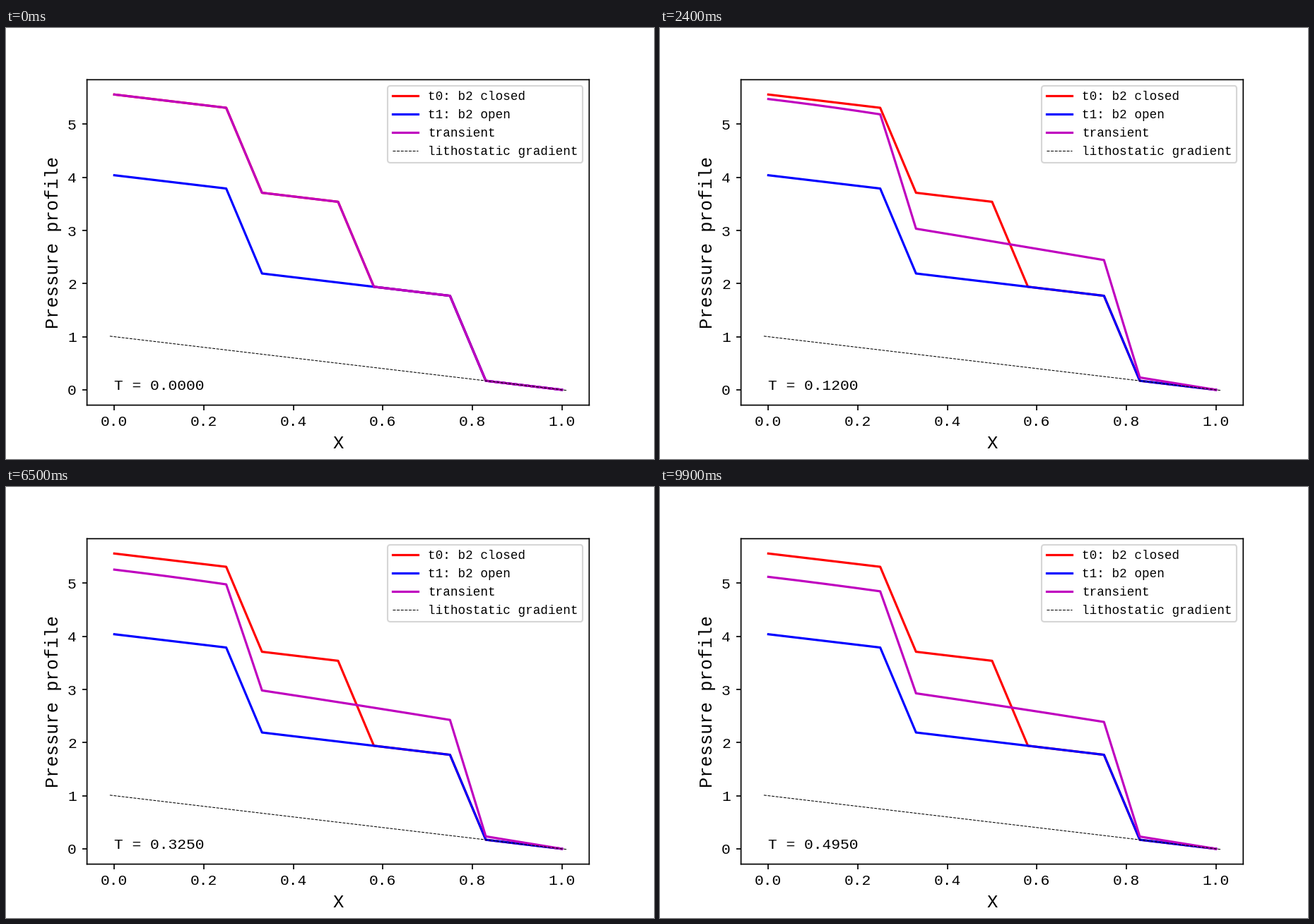
Animation of 917 by 611 pixels, one loop 10000 ms. Source, as a matplotlib script:

```python
import numpy as np
import matplotlib.pyplot as plt
from matplotlib.animation import FuncAnimation

W, H, DPI = 917, 611, 152.8
FRAMES, INTERVAL, DT = 100, 100, 0.005
N = 400
BARRIERS = [(0.25, 0.33), (0.50, 0.58), (0.75, 0.83)]
K_BARRIER = 1 / 20

plt.rcParams.update({
    "font.family": "Liberation Mono",
    "font.size": 10,
    "axes.labelsize": 12,
    "legend.fontsize": "small",
    "figure.subplot.bottom": 0.125,
})

x = np.linspace(0, 1, N + 1)
h = 1 / N
mid = (x[:-1] + x[1:]) / 2


def conductivity(barriers):
    k = np.ones(N)
    for a, b in barriers:
        k[(mid > a) & (mid < b)] = K_BARRIER
    return k


def steady(k):
    """Pressure for unit flux with zero pressure at x = 1."""
    return np.append(np.cumsum((h / k)[::-1])[::-1], 0)


k_open = conductivity([BARRIERS[0], BARRIERS[2]])
p_closed = steady(conductivity(BARRIERS))
p_open = steady(k_open)

# Diffusion operator on the free nodes, symmetrised by the cell masses
mass = np.full(N, h)
mass[0] = h / 2
g = k_open / h
stiff = np.diag(g + np.append(0, g[:-1])) - np.diag(g[:-1], 1) - np.diag(g[:-1], -1)
root = np.sqrt(mass)
rates, modes = np.linalg.eigh(stiff / np.outer(root, root))
weights = modes.T @ (root * (p_closed - p_open)[:-1])


def transient(t):
    excess = modes @ (weights * np.exp(-rates * t)) / root
    return p_open + np.append(excess, 0)


fig, ax = plt.subplots(figsize=(W / DPI, H / DPI), dpi=DPI)
ax.plot(x, p_closed, "r", label="t0: b2 closed")
ax.plot(x, p_open, "b", label="t1: b2 open")
curve, = ax.plot(x, p_closed, "m", label="transient")
ax.plot([-0.01, 1.01], [1.01, -0.01], "k--", lw=0.5, label="lithostatic gradient")
clock = ax.text(0, 0, "T = 0.0000")
ax.set_xlabel("X")
ax.set_ylabel("Pressure profile")
ax.legend(loc="upper right")
for spine in ax.spines.values():
    spine.set_snap(False)


def update(i):
    t = i * DT
    curve.set_ydata(transient(t))
    clock.set_text(f"T = {t:.4f}")
    return curve, clock


anim = FuncAnimation(fig, update, frames=FRAMES, interval=INTERVAL, repeat=True)
plt.show()
```
